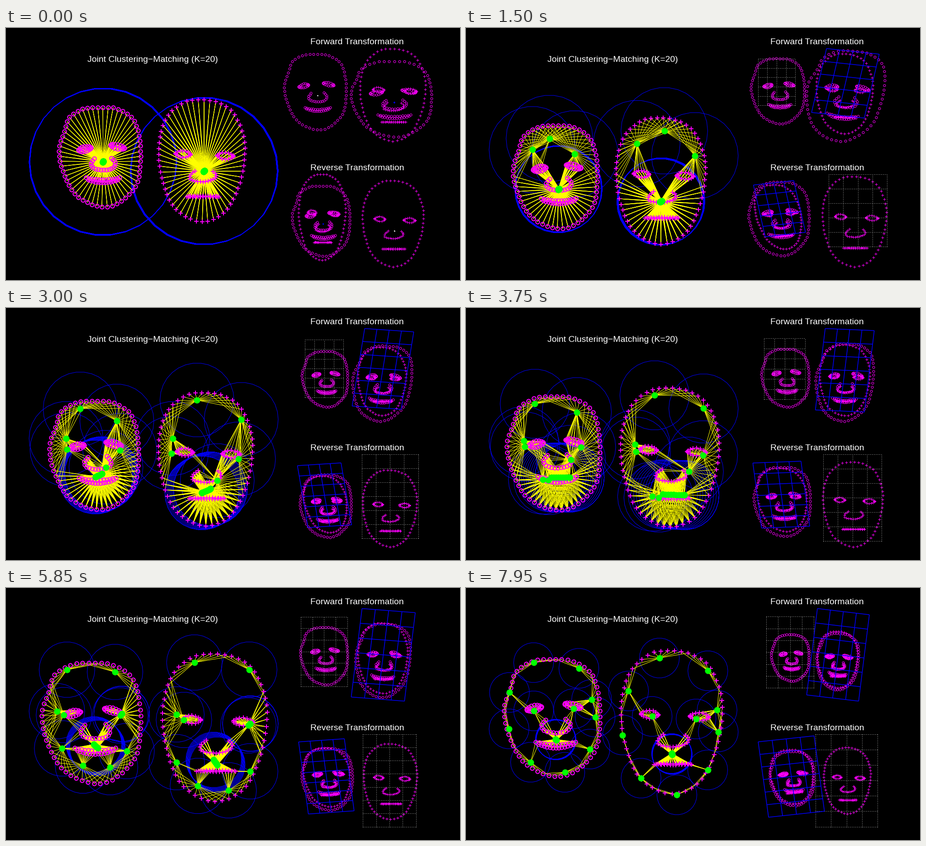
Recreate the animation shown at these times as a matplotlib script. Size 1004x558 px, loop 8 s.

```python
import numpy as np
import matplotlib.pyplot as plt
from matplotlib.animation import FuncAnimation
from matplotlib.collections import LineCollection

W, H, DPI = 1004, 558, 64
PX = 72 / DPI
MAGENTA, BLUE, YELLOW, GREEN = "#ff00ff", "#0000ff", "#ffff00", "#00ff00"


# ---- the two faces -------------------------------------------------------

def curve(pts, n, closed=False):
    """n points evenly spaced along a Catmull-Rom curve."""
    p = np.reshape(pts, (-1, 2)).astype(float)
    if closed:
        p = np.vstack([p[-1], p, p[:2]])
    else:
        p = np.vstack([2 * p[0] - p[1], p, 2 * p[-1] - p[-2]])
    a, b, c, d = p[:-3], p[1:-2], p[2:-1], p[3:]
    t = np.linspace(0, 1, 20, endpoint=False)[:, None, None]
    q = b + (c - a) * t / 2 + (2 * a - 5 * b + 4 * c - d) * t**2 / 2 \
        + (3 * b - a - 3 * c + d) * t**3 / 2
    q = np.vstack([q.transpose(1, 0, 2).reshape(-1, 2), c[-1]])
    s = np.r_[0, np.cumsum(np.hypot(*np.diff(q, axis=0).T))]
    at = np.linspace(0, s[-1], n, endpoint=not closed)
    return np.column_stack([np.interp(at, s, q[:, 0]), np.interp(at, s, q[:, 1])])


def eye(x, y, a, b, tilt):
    t = np.linspace(0, 2 * np.pi, 16, endpoint=False)
    lid = np.sin(t) * np.sqrt(np.abs(np.sin(t)))
    return np.column_stack([x + a * np.cos(t), y + b * lid + tilt * np.cos(t)])


def lip(x0, x1, y, sag):
    s = np.linspace(-1, 1, 13)
    return np.column_stack([(x0 + x1) / 2 + s * (x1 - x0) / 2, y + sag * (1 - s**2)])


FACE_X = np.vstack([
    curve([193, 167, 232, 171, 273, 198, 290, 247, 293, 316, 280, 378, 229, 426,
           175, 430, 118, 398, 84, 332, 76, 276, 91, 230, 103, 194, 143, 170], 57, True),
    eye(144, 278, 17, 7, -3), eye(232, 272, 19, 6, 4),
    curve([170, 304, 161, 317, 168, 329, 193, 334, 219, 329, 226, 315, 216, 302], 17),
    lip(148, 238, 354.5, 6), lip(154, 233, 360, 8),
])
FACE_Y = np.vstack([
    curve([448, 147, 497, 153, 541, 181, 568, 240, 572, 298, 557, 376, 519, 447,
           453, 473, 383, 434, 349, 348, 343, 265, 363, 195, 407, 155], 57, True),
    eye(407, 292, 20, 9, 1), eye(520, 297, 22, 9, 1),
    curve([439, 337, 426, 349, 429, 361, 461, 366, 491, 358, 496, 347, 488, 339], 18),
    lip(417, 503, 406, -2), lip(421, 500, 405, 2),
])


# ---- annealing -----------------------------------------------------------

BEAT = 10   # steps between the spots a cluster visits


def bunch(step, s):
    """Undivided clusters: one point that opens into a slanted row and closes."""
    w = 1 + 24 * np.exp(-((step - 27) / 7) ** 2)
    tilt = np.clip(0.11 * (step - 24), -1, 1)
    y = 349 - 37 * np.exp(-(step / 12) ** 2)
    return np.array([193 + w * (0.4 + s), y + w * (0.4 + s * tilt)])


# (step of leaving, end of the row it leaves from, spots visited)
TRACKS = [
    (1, -1, [170, 200, 146, 183, 130, 186, 132, 179, 143, 174]),
    (1, 1, [235, 240, 242, 210, 233, 188, 240, 186, 246, 187]),
    (1, -1, [126, 229, 114, 266, 118, 283, 103, 267, 88, 242]),
    (11, -1, [118, 285, 118, 282, 129, 282, 143, 284]),
    (11, 1, [248, 287, 252, 282, 252, 277, 275, 258]),
    (11, 1, [214, 329, 252, 283, 252, 278, 234, 279]),
    (21, -1, [150, 364, 101, 350, 87, 325]),
    (21, -1, [169, 366, 165, 412, 136, 401]),
    (31, 1, [228, 400, 214, 424]),
    (31, 1, [267, 362, 271, 371]),
    (31, 1, [252, 278, 283, 298]),
]
STAY = np.linspace(-1, 1, 9)   # clusters that never leave


def place(step, leave, end, spots):
    home = bunch(step, end)
    if step <= leave:
        return home
    spots = np.reshape(spots, (-1, 2))
    u = (step - leave) / BEAT
    if u < 1:
        return home + (spots[0] - home) * (1 - (1 - u) ** 3)
    return np.array([np.interp(u - 1, np.arange(len(spots)), c) for c in spots.T])


def centres(step):
    return np.array([place(step, *t) for t in TRACKS] + [bunch(step, s) for s in STAY])


def radius(step):
    return 136 * np.exp(-0.0215 * step) + 60.5 * np.exp(-step / 3)


def warps(step):
    """The affine map from face 1 to face 2, and its inverse."""
    def at(*v):
        return np.interp(step, [0, 10, 24, 51], v)

    m = np.array([[at(1.3, 1.41, 1.2, 1.09), at(0, 0.15, 0.05, 0.13)],
                  [at(0, -0.32, -0.16, -0.15), at(1.0, 1.37, 1.33, 1.21)]])
    a, b = np.array([193, 312]), np.array([463, 337])
    back = np.linalg.inv(m)
    return (lambda p: (p - a) @ m + b), (lambda p: (p - b) @ back + a)


def links(pts, hubs, r):
    """Segments from each point to the clusters it belongs to."""
    d2 = ((pts[:, None] - hubs[None]) ** 2).sum(2)
    m = np.exp(-2 * (d2 - d2.min(1, keepdims=True)) / r**2)
    m /= m.sum(1, keepdims=True)
    i, k = np.nonzero(m > 0.048)
    return np.hstack([pts[i], hubs[k]])


def grid(hubs):
    """Square cells over the clusters with a margin of a fifth."""
    lo, hi = hubs.min(0), hubs.max(0)
    span = hi - lo
    cell = max(0.35 * span[0], 1e-3)
    rows = max(1, int(np.ceil(1.4 * span[1] / cell)))
    xs = lo[0] - 0.2 * span[0] + cell * np.arange(5)
    ys = hi[1] + 0.2 * span[1] - cell * np.arange(rows + 1)
    lines = [[(x, ys[0]), (x, ys[-1])] for x in xs]
    lines += [[(xs[0], y), (xs[-1], y)] for y in ys]
    return np.array(lines)


# ---- drawing -------------------------------------------------------------

fig = plt.figure(figsize=(W / DPI, H / DPI), dpi=DPI, facecolor="black")
ax = fig.add_axes([0, 0, 1, 1])
ax.set_xlim(0, W)
ax.set_ylim(H, 0)
ax.axis("off")

for x, y, label in [(324, 75, "Joint Clustering\u2212Matching (K=20)"),
                    (776.5, 36, "Forward Transformation"),
                    (776.5, 315, "Reverse Transformation")]:
    ax.text(x, y, label, color="white", ha="center", va="baseline",
            family="Liberation Sans", size=19.4 * PX)


def strokes(color, z, width=1, **kw):
    lc = LineCollection([], colors=color, linewidths=width * PX, zorder=z, **kw)
    ax.add_collection(lc, autolim=False)
    return lc


def dots(marker, size, width, color=MAGENTA, fill="none", z=4):
    return ax.plot([], [], marker, ms=size * PX, mew=width * PX, mec=color, mfc=fill,
                   zorder=z)[0]


def put(line, pts):
    line.set_data(pts[:, 0], pts[:, 1])


rings = strokes(BLUE, 2)
spokes = strokes(YELLOW, 3)
left_x = dots("o", 8.5, 2)
left_y = dots("+", 10, 2)
green = dots("o", 14, 0, GREEN, GREEN, 5)

turn = np.linspace(0, 2 * np.pi, 31)
CIRCLE = np.column_stack([np.cos(turn), np.sin(turn)])


class Panel:
    """One warp view: the resting face, and its warped copy over the other face."""

    def __init__(self, top, marks):
        self.top = top
        self.flat = strokes("white", 5, linestyles=[(0, (1, 3))])
        self.bent = strokes(BLUE, 6, 1.5)
        self.rest, self.warped, self.goal = (
            dots(m, 5 if m == "o" else 6, 1) for m in (marks[0], marks[0], marks[1]))

    def draw(self, src, dst, hubs, warp):
        g = grid(hubs)
        parts = [src, warp(src), dst, g, warp(g)]
        every = np.vstack([p.reshape(-1, 2) for p in parts])
        lo, hi = every.min(0), every.max(0)
        scale = 205 / (hi[1] - lo[1])
        parts = [(p - (lo + hi) / 2) * scale + (778, self.top + 102.5) for p in parts]
        for line, p in zip((self.rest, self.warped, self.goal), parts):
            put(line, p)
        self.flat.set_segments(parts[3])
        self.bent.set_segments(parts[4])


forward = Panel(45.5, "o+")
reverse = Panel(323.5, "+o")


def update(frame):
    slot = frame // 3
    step = slot - (slot >= 18) - (slot >= 33)   # two short holds
    r = radius(step)
    ahead, back = warps(step)
    cx = centres(step)
    cy = ahead(cx)
    hubs = np.vstack([cx, cy])

    lo, hi = hubs.min(0) - r, hubs.max(0) + r
    scale = 551 / (hi[0] - lo[0])

    def fit(p):
        return (p - (lo + hi) / 2) * scale + (326.5, 306.5)

    rings.set_segments(fit(hubs[:, None] + r * CIRCLE))

    seg = np.vstack([links(FACE_X, cx, r), links(FACE_Y, cy, r)]).reshape(-1, 2, 2)
    seg = np.unique(np.round(fit(seg)).reshape(-1, 4), axis=0)
    spokes.set_segments(seg.reshape(-1, 2, 2))

    put(left_x, fit(FACE_X))
    put(left_y, fit(FACE_Y))
    put(green, fit(hubs))
    forward.draw(FACE_X, FACE_Y, cx, ahead)
    reverse.draw(FACE_Y, FACE_X, cy, back)
    return []


anim = FuncAnimation(fig, update, frames=160, interval=50, repeat=True, repeat_delay=0)
plt.show()
```
